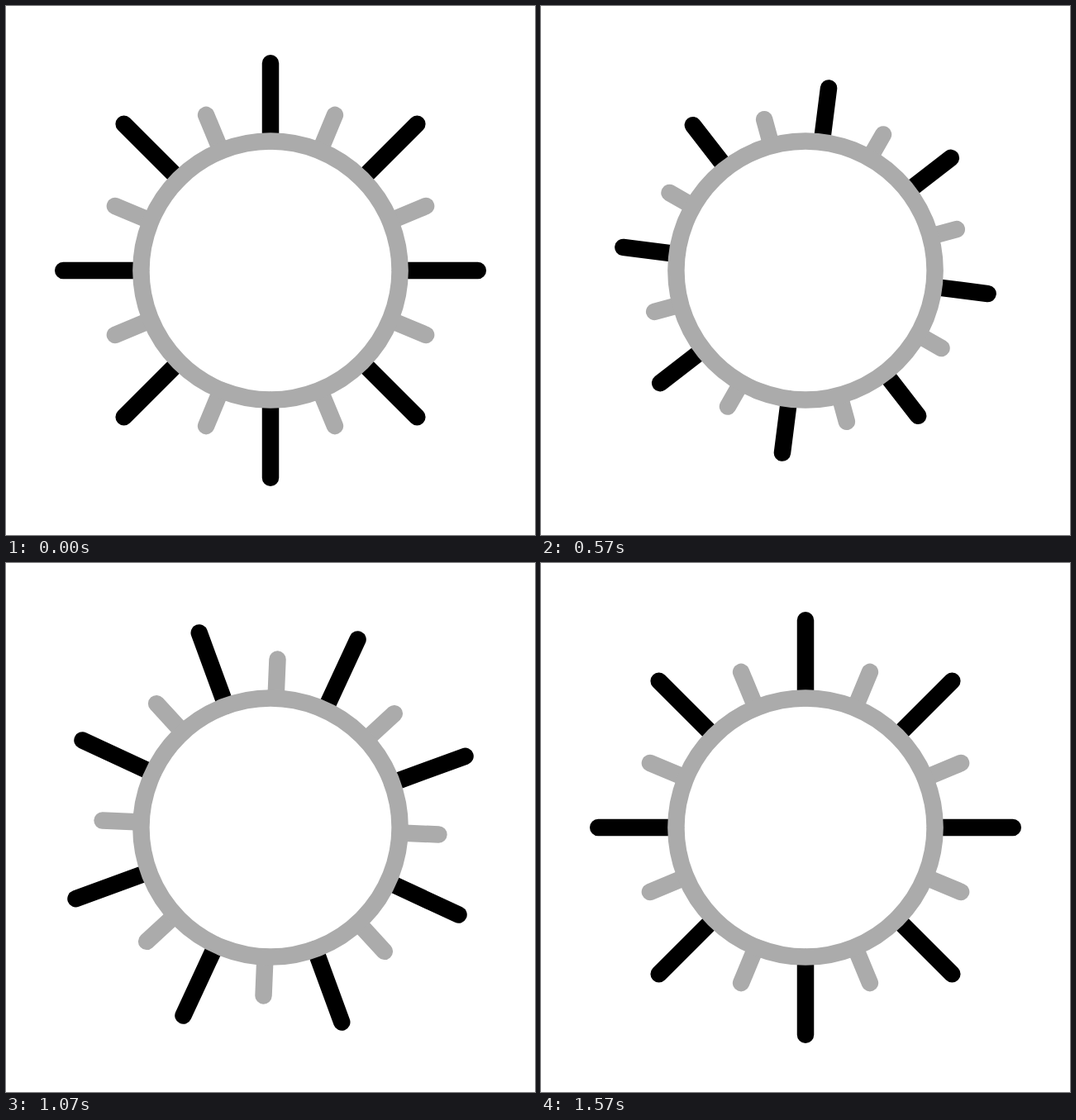
Write an HTML page that moves like this. It is 640 px wide and 640 px high and loops after 1.67 s.

```html
<!DOCTYPE html>
<html lang="en">
<head>
<meta charset="utf-8">
<title>Sun</title>
<style>
  html, body { margin: 0; width: 100%; height: 100%; overflow: hidden; background: #fff; }
  svg { display: block; width: 100vw; height: 100vh; }
  svg * { fill: none; stroke-width: 20.5; stroke-linecap: round; }
  .long { stroke: #000; }
  .short, .ring { stroke: #ababab; }
</style>
</head>
<body>
<svg viewBox="-320 -320 640 640">
  <g id="rays">
    <path class="long"/>
    <path class="short"/>
  </g>
  <circle class="ring" r="156.6"/>
</svg>
<script>
const LOOP = 1670, STEP = 100 / 3, LAST = 47;
const INNER = 157, LONG = 250.8, SHORT = 203.6;

// Keys: [step, value, easing handles x1, x2 toward the next key]
const TURN = [[0, 0, .32, .56], [19, -38.5, .38, .56], [47, 0]];
const REACH = [[0, 1, .35, .6], [11, .24, .35, .6], [22, 1]];

const rays = document.getElementById('rays');
const longRays = rays.querySelector('.long');
const shortRays = rays.querySelector('.short');

// Bezier ease with flat ends: y = 3s² - 2s³
function ease(x, x1, x2) {
  let lo = 0, hi = 1;
  for (let i = 0; i < 24; i++) {
    const s = (lo + hi) / 2, r = 1 - s;
    if (3 * s * r * r * x1 + 3 * s * s * r * x2 + s * s * s < x) lo = s;
    else hi = s;
  }
  return lo * lo * (3 - 2 * lo);
}

function valueAt(keys, n) {
  for (let i = 0; i < keys.length - 1; i++) {
    const [start, from, x1, x2] = keys[i];
    const [end, to] = keys[i + 1];
    if (n < end) return from + (to - from) * ease((n - start) / (end - start), x1, x2);
  }
  return keys[keys.length - 1][1];
}

function spokes(tip, offset) {
  let d = '';
  for (let i = 0; i < 8; i++) {
    const a = (i * 45 + offset) * Math.PI / 180;
    const at = r => `${(r * Math.sin(a)).toFixed(2)} ${(-r * Math.cos(a)).toFixed(2)}`;
    d += `M${at(INNER)}L${at(tip)}`;
  }
  return d;
}

function draw(now) {
  const t = Math.floor((now % LOOP) / 10) * 10;
  const n = Math.min(LAST, Math.floor((t + 5) / STEP));
  const reach = valueAt(REACH, n);
  rays.setAttribute('transform', `rotate(${valueAt(TURN, n).toFixed(3)})`);
  longRays.setAttribute('d', spokes(INNER + (LONG - INNER) * reach, 0));
  shortRays.setAttribute('d', spokes(INNER + (SHORT - INNER) * reach, 22.5));
}

const begin = performance.now();
function tick() {
  draw(performance.now() - begin);
  requestAnimationFrame(tick);
}
tick();
</script>
</body>
</html>
```
